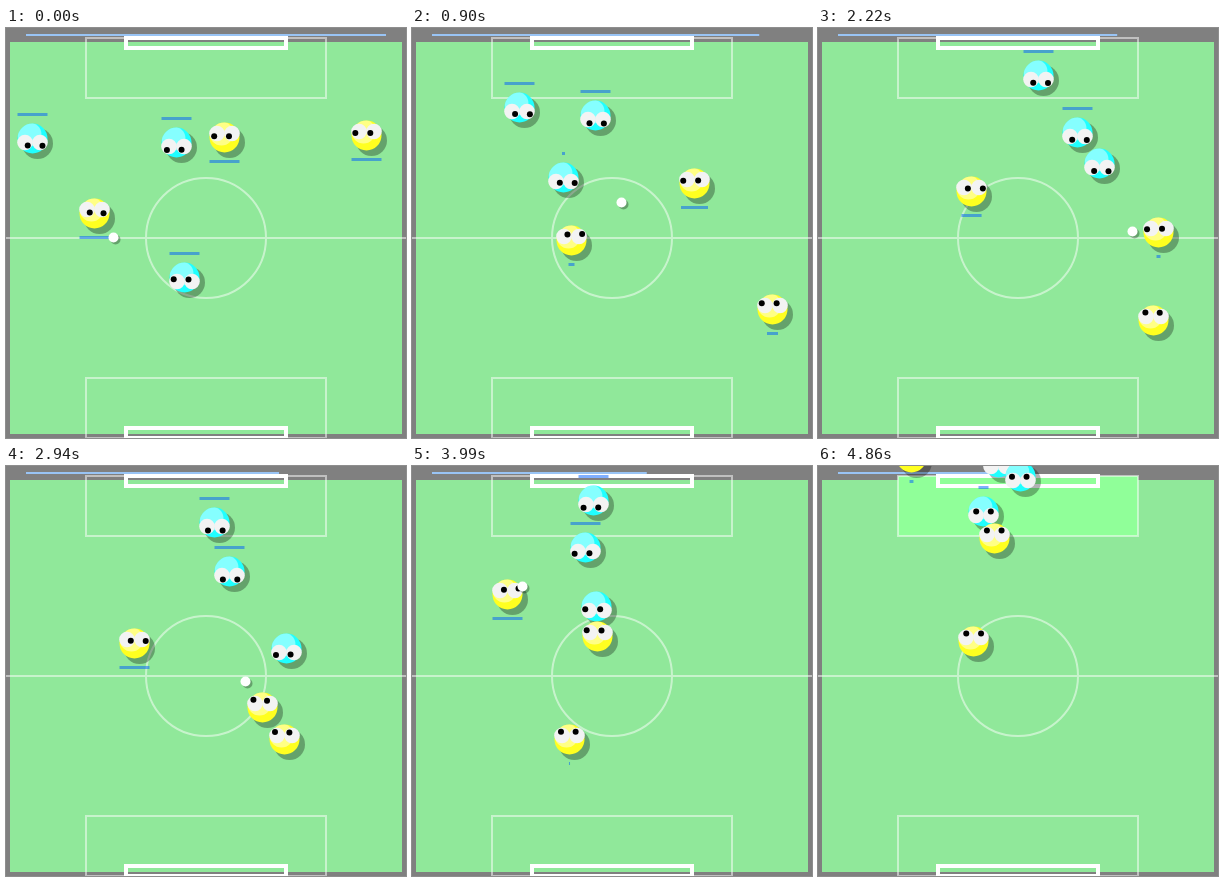
Recreate the animation shown at these times as an HTML page with a canvas. Size 400 by 410 pixels, loop 4890 ms.

```html
<!DOCTYPE html>
<html lang="en">
<head>
<meta charset="utf-8">
<title>Tiny football</title>
<style>
html, body { margin: 0; width: 100%; height: 100%; overflow: hidden; background: #808080; }
canvas { display: block; }
</style>
</head>
<body>
<canvas id="pitch" width="400" height="410"></canvas>
<script>
const ctx = document.getElementById('pitch').getContext('2d');
const LOOP = 4890, STEP = 30;
const FULL = 30, DRAIN = 0.03, REGEN = 0.015;   // stamina, per ms
const SHADOW = 'rgba(0,0,0,.3)';
const CYAN = { body: '#20ffff', side: 1 };
const YELLOW = { body: '#ffff20', side: -1 };

// Moments of play shared by every path below
const BEATS = [0, 900, 1440, 2220, 2940, 3990, 4860];

const ballPath = [[107, 209], [209, 174], [238, 128], [314, 203], [239, 215], [110, 120], [165, -100]];

// Sprints are [from, to] times; stamina drains during them and recovers otherwise
const players = [
  { team: CYAN, sprints: [],
    path: [[26, 110], [107, 79], [162, 58], [220, 47], [208, 56], [181, 34], [180, -4]] },
  { team: CYAN, sprints: [],
    path: [[170, 114], [183, 87], [236, 78], [259, 104], [223, 105], [173, 81], [202, 10]] },
  { team: CYAN, sprints: [[0, 4193]],
    path: [[178, 249], [151, 149], [222, 117], [281, 135], [280, 182], [184, 140], [165, 45]] },
  { team: YELLOW, sprints: [[100, 1026], [3990, LOOP]],
    path: [[88, 185], [159, 212], [185, 146], [153, 163], [128, 177], [95, 128], [93, -9]] },
  { team: YELLOW, sprints: [[800, 900], [1107, 1440], [1604, LOOP]],
    path: [[218, 109], [282, 155], [298, 148], [340, 204], [256, 241], [185, 170], [176, 72]] },
  { team: YELLOW, sprints: [[267, 1267], [1440, 3920], [3990, LOOP]],
    path: [[360, 107], [360, 281], [351, 318], [335, 292], [278, 273], [157, 273], [155, 175]] }
];

function beatAt(t) {
  let i = 0;
  while (i < BEATS.length - 2 && t >= BEATS[i + 1]) i++;
  const span = BEATS[i + 1] - BEATS[i];
  return { i, span, u: (t - BEATS[i]) / span };
}

function straight(path, t) {
  const { i, u } = beatAt(t);
  const [x, y] = path[i].map((v, axis) => v + (path[i + 1][axis] - v) * u);
  return { x, y };
}

// Cubic Hermite curve through the path's points
function curved(path, t) {
  const { i, span, u } = beatAt(t);
  const coord = axis => {
    const slope = k => {
      const p = Math.max(0, k - 1), n = Math.min(path.length - 1, k + 1);
      return (path[n][axis] - path[p][axis]) / (BEATS[n] - BEATS[p]) * span;
    };
    const a = path[i][axis], d = path[i + 1][axis] - a;
    const m = slope(i), n = slope(i + 1);
    return a + u * (m + u * (3 * d - 2 * m - n + u * (m + n - 2 * d)));
  };
  return { x: coord(0), y: coord(1) };
}

function stamina(sprints, t) {
  let level = FULL, last = 0;
  const rest = until => { level = Math.min(FULL, level + REGEN * (until - last)); };
  for (const [from, to] of sprints) {
    if (from > t) break;
    rest(from);
    last = Math.min(to, t);
    level = Math.max(0, level - DRAIN * (last - from));
  }
  rest(t);
  return level;
}

function disc(x, y, r, color) {
  ctx.fillStyle = color;
  ctx.beginPath();
  ctx.arc(x, y, r, 0, 2 * Math.PI);
  ctx.fill();
}

function drawPitch(t, scored) {
  ctx.fillStyle = '#808080';
  ctx.fillRect(0, 0, 400, 410);
  ctx.fillStyle = '#90e89a';
  ctx.fillRect(4, 14, 392, 392);
  if (scored) {
    ctx.fillStyle = '#90ff99';
    ctx.fillRect(80, 10, 240, 60);
  }

  ctx.strokeStyle = 'rgba(255,255,255,.5)';
  ctx.lineWidth = 2;
  ctx.strokeRect(80, 10, 240, 60);
  ctx.strokeRect(80, 350, 240, 60);
  ctx.beginPath();
  ctx.moveTo(0, 210);
  ctx.lineTo(400, 210);
  ctx.moveTo(260, 210);
  ctx.arc(200, 210, 60, 0, 2 * Math.PI);
  ctx.stroke();

  ctx.strokeStyle = '#fff';
  ctx.lineWidth = 4;
  ctx.strokeRect(120, 10, 160, 10);
  ctx.strokeRect(120, 400, 160, 10);

  // Remaining match time
  ctx.fillStyle = '#99c4f5';
  ctx.fillRect(20, 6, 360 - t * 0.0364, 2);
}

function drawPlayer({ team, x, y, level }, ball) {
  disc(x, y, 15, team.body);
  ctx.save();
  ctx.clip();
  disc(x - 3, y - 4, 12, 'rgba(255,255,255,.45)');
  ctx.restore();

  const eyeY = y + 4 * team.side;
  const eyes = [x - 7.5, x + 7.5];
  for (const eyeX of eyes) disc(eyeX, eyeY, 7.8, '#f3f3f3');
  for (const eyeX of eyes) {
    const gaze = Math.atan2(ball.y - eyeY, ball.x - eyeX);
    disc(eyeX + 4 * Math.cos(gaze), eyeY + 4 * Math.sin(gaze), 3, '#000');
  }

  ctx.fillStyle = 'rgba(0,94,255,.5)';
  ctx.fillRect(x - level / 2, y - 24 * team.side - 1.5, level, 3);
}

function draw(t) {
  const ball = straight(ballPath, t);
  const squad = players.map(({ team, path, sprints }) =>
    ({ team, ...curved(path, t), level: stamina(sprints, t) }));

  drawPitch(t, ball.y < 10);
  ctx.save();
  ctx.translate(0.5, 0.5);   // positions are pixel centres
  for (const p of squad) disc(p.x + 5, p.y + 5, 15.5, SHADOW);
  for (const p of squad) drawPlayer(p, ball);
  disc(ball.x + 2, ball.y + 2, 5, SHADOW);
  disc(ball.x, ball.y, 5, '#fff');
  ctx.restore();
}

const start = performance.now();
function tick() {
  const t = (performance.now() - start) % LOOP;
  draw(Math.floor(t / STEP) * STEP);
  requestAnimationFrame(tick);
}
tick();
</script>
</body>
</html>
```
